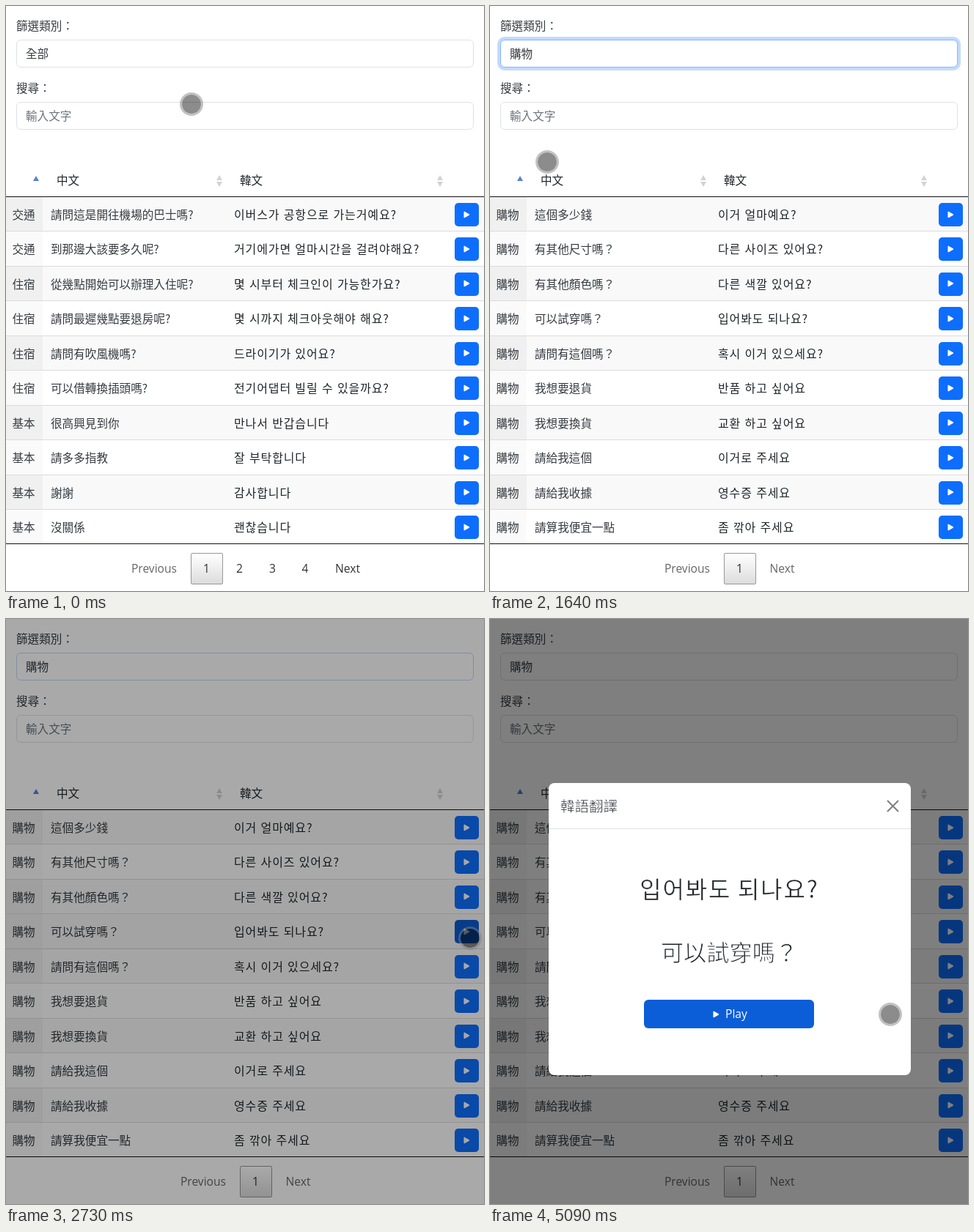
Recreate the animation shown at these times as an HTML page. Size 652 px wide and 799 px high, loop 6 s.

```html
<!DOCTYPE html>
<html lang="zh-Hant">
<head>
<meta charset="utf-8">
<title>韓語翻譯</title>
<style>
html, body { margin: 0; width: 100%; height: 100%; overflow: hidden; background: #fff; }
body {
  position: relative; color: #363b40;
  font: 350 15.6px/24px "Noto Sans CJK TC", "Noto Sans CJK JP", "Noto Sans CJK", sans-serif;
}
#stage { position: absolute; inset: 0; width: 652px; height: 799px; overflow: hidden; white-space: nowrap; }
#stage * { position: absolute; box-sizing: border-box; }
.ko { color: #212529; font: 400 16px/24px "Noto Sans CJK KR", "Noto Sans CJK JP", "Noto Sans CJK", sans-serif; letter-spacing: .055em; }
.en { font: 400 15.6px/24px "Open Sans", "Noto Sans", sans-serif; }

/* form */
.field { left: 14px; width: 624px; height: 38px; border: 1px solid #dee2e6; border-radius: 6px; background: #fff; }
.field span { left: 12px; top: 5px; }
.hint { color: #6c757d; }

/* table */
.head { left: 0; top: 260px; width: 652px; height: 1px; background: #111; }
.foot { left: 0; top: 734px; width: 652px; height: 1px; background: #111; }
.row { left: 0; width: 652px; height: 47.45px; border-bottom: 1px solid #dcdcdc; background: #fff; }
.row:nth-child(odd) { background: #f9f9f9; }
.row:last-child { border: 0; }
.row .cat { left: 0; top: 0; width: 50px; height: 100%; padding: 11px 0 0 8.5px; background: #fafafa; }
.row:nth-child(odd) .cat { background: #f0f0f0; }
.row .zh { left: 61px; top: 11px; }
.row .ko { left: 311px; top: 11px; }
.row .btn { left: 612px; top: 8px; width: 33px; height: 32px; border-radius: 5px; background: #0d6efd; }
.tri { width: 9px; height: 10px; fill: #fff; stroke: #fff; stroke-linejoin: round; stroke-width: 1.5; }
.btn .tri { left: 11.5px; top: 10.5px; }

/* pagination */
.page { top: 756px; width: 80px; margin-left: -40px; text-align: center; color: #333; }
.off { color: #666; }
.current { top: 747px; width: 44px; height: 43px; border: 1px solid #979797; border-radius: 2px; background: linear-gradient(#fff, #dcdcdc); }

/* dropdown */
#menu {
  left: 14px; top: 84px; width: 624px; height: 191px; padding: 0; overflow: visible;
  border: 1px solid #a4a4a4; border-radius: 5px; background: #fff;
  box-shadow: 0 24px 36px -10px rgba(0,0,0,.32), 0 2px 8px rgba(0,0,0,.16);
}
#menu div { left: 0; width: 622px; height: 31.7px; padding: 3px 0 0 12px; }

/* modal; the white text stroke thins the large glyphs */
#shade { inset: 0; background: #000; opacity: 0; }
#modal { left: 80px; top: 224px; width: 494px; height: 399px; border-radius: 8px; background: #fff; }
#modal h5 { left: 16px; top: 16px; margin: 0; font-size: 19.5px; font-weight: 350; line-height: 30px; -webkit-text-stroke: .4px #fff; }
#modal hr { left: 0; top: 62px; width: 494px; height: 1px; margin: 0; border: 0; background: #dee2e6; }
#modal p { left: 1px; width: 491px; margin: 0; text-align: center; line-height: 46px; color: #212529; -webkit-text-stroke: .9px #fff; }
#close { left: 461px; top: 23px; width: 17px; height: 17px; fill: none; stroke: #7f7f7f; stroke-width: 2; stroke-linecap: round; }
#play { left: 130px; top: 296px; width: 232px; height: 39px; border-radius: 6px; background: #0d6efd; color: #fff; }
#play .tri { left: 94px; top: 15px; }
#play b { left: 111px; top: 7px; font-weight: 500; }
#play i { left: 88px; top: 15px; width: 10px; height: 10px; border: solid #fff; border-width: 0 3.5px; border-radius: 2px; }
#play .pause b { left: 104px; }

/* pointers */
#dot, #arrow { left: 0; top: 0; }
#dot {
  width: 32px; height: 32px; margin: -16px; border-radius: 50%;
  border: 3px solid rgba(128,128,128,.48); background: rgba(0,0,0,.45); background-clip: padding-box;
}
#arrow { width: 13px; height: 20px; fill: #fff; stroke: #222; stroke-width: 1; }

.before, .after, .ring, #menu, .first, .third, .touched, .touched .btn, #shade, #modal, #play, .play, .pause, #dot, #arrow {
  animation: 6s step-end infinite;
}
.before { animation-name: before; }
.after { animation-name: after; }
.ring { animation-name: ring; }
#menu { animation-name: menu; }
.first { animation-name: first; }
.third { animation-name: third; }
.touched { animation-name: touch; }
.touched .btn { animation-name: press; }
#shade { animation-name: shade; }
#modal { animation-name: modal; }
#play { animation-name: hover; }
.play { animation-name: play; }
.pause { animation-name: pause; }
#dot { animation-name: dot; }
#arrow { animation-name: arrow; }

@keyframes before { 0% { visibility: visible } 21.16%, 100% { visibility: hidden } }
@keyframes after { 0% { visibility: hidden } 21.16%, 100% { visibility: visible } }
@keyframes ring {
  0% { border-color: #dee2e6; box-shadow: none }
  9.16% { border-color: #86b7fe; box-shadow: 0 0 0 4px rgba(13,110,253,.25) }
  44% { border-color: #9dc4fd; box-shadow: 0 0 0 3px rgba(13,110,253,.18) }
  45.5% { border-color: #c3d7f5; box-shadow: none }
  47%, 100% { border-color: #dee2e6; box-shadow: none }
}
@keyframes menu { 0% { visibility: hidden } 10.66% { visibility: visible } 21.16%, 100% { visibility: hidden } }
@keyframes first { 0% { background: #ade0f5; color: #fff } 19.66%, 100% { background: none; color: #363b40 } }
@keyframes third { 0% { background: none; color: #363b40 } 19.66%, 100% { background: #ade0f5; color: #fff } }
@keyframes touch { 0% { filter: none } 44% { filter: brightness(.96) } 60.66%, 100% { filter: none } }
@keyframes press { 0% { background: #0d6efd } 41% { background: #0b5ed7 } 60.66%, 100% { background: #0d6efd } }
@keyframes shade { 0% { opacity: 0 } 44% { opacity: .08 } 45.5% { opacity: .336 } 47%, 100% { opacity: .5 } }
@keyframes modal {
  0% { visibility: hidden; translate: 0 -50px }
  48.5% { visibility: visible; translate: 0 -16px }
  50% { visibility: visible; translate: 0 -3px }
  51.5%, 100% { visibility: visible; translate: 0 0 }
}
@keyframes hover { 0% { background: #0d6efd } 56%, 100% { background: #0b5ed7 } }
@keyframes play { 0% { opacity: 1 } 60.66% { opacity: 0 } 83.33%, 100% { opacity: 1 } }
@keyframes pause { 0% { opacity: 0 } 60.66% { opacity: 1 } 83.33%, 100% { opacity: 0 } }
@keyframes arrow {
  0% { visibility: hidden; translate: 132px 66px }
  12.16% { visibility: visible; translate: 120px 92px }
  13.66% { visibility: visible; translate: 88px 140px }
  15.16% { visibility: visible; translate: 62px 188px }
  16.66% { visibility: visible; translate: 52px 212px }
  19.66% { visibility: visible; translate: 53px 204px }
  22.66%, 100% { visibility: hidden; translate: 53px 204px }
}
@keyframes dot {
  0% { translate: 253px 134px; visibility: visible }
  1.5% { translate: 232px 84px }
  3% { translate: 196px 40px }
  4.5% { translate: 162px 22px }
  6% { translate: 148px 60px; visibility: visible }
  12.16% { translate: 59px 208px; visibility: hidden }
  22.66% { translate: 59px 208px; visibility: visible }
  27.33% { translate: 78px 213px }
  28.83% { translate: 150px 238px }
  30.33% { translate: 274px 290px }
  31.83% { translate: 412px 356px }
  33.33% { translate: 528px 416px }
  34.83% { translate: 598px 448px }
  36.33% { translate: 624px 454px }
  37.83% { translate: 629px 446px }
  39.33% { translate: 631px 439px }
  41% { translate: 632px 436px }
  45.5% { translate: 633px 436px }
  47% { translate: 629px 437px }
  48.5% { translate: 346px 531px }
  50% { translate: 326px 541px }
  51.5% { translate: 318px 545px }
  56% { translate: 315px 547px }
  57.5% { translate: 311px 550px }
  59.16% { translate: 307px 553px }
  60.66% { translate: 305px 554px }
  65.16% { translate: 304px 554px }
  72.66% { translate: 340px 552px }
  74.33% { translate: 436px 546px }
  75.83% { translate: 520px 541px }
  77.33% { translate: 543px 540px }
  83.33% { translate: 545px 540px }
  84.83%, 100% { translate: 546px 540px; visibility: visible }
}
</style>
</head>
<body>
<div id="stage">
  <span style="left:14px;top:14px">篩選類別：</span>
  <div class="field ring" style="top:46px"><span class="before">全部</span><span class="after">購物</span></div>
  <span style="left:14px;top:99px">搜尋：</span>
  <div class="field" style="top:131px"><span class="hint">輸入文字</span></div>

  <svg style="left:0;top:220px" width="652" height="40">
    <path fill="#5b7fd6" d="M37 19l4-7 4 7z"/>
    <path fill="#d3d3d3" d="M287 18l4-7 4 7zM287 20h8l-4 7zM588 18l4-7 4 7zM588 20h8l-4 7z"/>
  </svg>
  <span style="left:69px;top:225px;color:#212529">中文</span>
  <span style="left:319px;top:225px;color:#212529">韓文</span>

  <div id="all" class="before" style="left:0;top:261px"></div>
  <div id="shop" class="after" style="left:0;top:261px"></div>
  <div class="head"></div>
  <div class="foot"></div>

  <div class="before en" style="left:0;top:0">
    <div class="current" style="left:252px"></div>
    <span class="page off" style="left:202px">Previous</span>
    <span class="page" style="left:273.5px">1</span>
    <span class="page" style="left:318.5px">2</span>
    <span class="page" style="left:363.5px">3</span>
    <span class="page" style="left:408px">4</span>
    <span class="page" style="left:466px">Next</span>
  </div>
  <div class="after en" style="left:0;top:0">
    <div class="current" style="left:319px"></div>
    <span class="page off" style="left:269px">Previous</span>
    <span class="page" style="left:340.5px">1</span>
    <span class="page off" style="left:398.5px">Next</span>
  </div>

  <div id="menu"></div>
  <div id="shade"></div>

  <div id="modal">
    <h5>韓語翻譯</h5>
    <svg id="close" viewBox="0 0 17 17"><path d="M1.5 1.5l14 14M15.5 1.5l-14 14"/></svg>
    <hr>
    <p class="ko" style="top:120px;font-size:32px;-webkit-text-stroke-width:.5px">입어봐도 되나요?</p>
    <p style="top:207px;font-size:31.2px">可以試穿嗎？</p>
    <div id="play" class="en">
      <div class="play" style="inset:0"><svg class="tri" viewBox="0 0 9 10"><path d="M1.2 1.4v7.2L7.4 5z"/></svg><b>Play</b></div>
      <div class="pause" style="inset:0"><i></i><b>Pause</b></div>
    </div>
  </div>

  <svg id="arrow" viewBox="0 0 13 20"><path d="M.7 1v15l3.5-3.3 2.4 5.8 2.4-1-2.4-5.6h4.9z"/></svg>
  <div id="dot"></div>
</div>
<script>
const all = [
  ['交通', '請問這是開往機場的巴士嗎?', '이버스가 공항으로 가는거예요?'],
  ['交通', '到那邊大該要多久呢?', '거기에가면 얼마시간을 걸려야해요?'],
  ['住宿', '從幾點開始可以辦理入住呢?', '몇 시부터 체크인이 가능한가요?'],
  ['住宿', '請問最遲幾點要退房呢?', '몇 시까지 체크아웃해야 해요?'],
  ['住宿', '請問有吹風機嗎?', '드라이기가 있어요?'],
  ['住宿', '可以借轉換插頭嗎?', '전기어댑터 빌릴 수 있을까요?'],
  ['基本', '很高興見到你', '만나서 반갑습니다'],
  ['基本', '請多多指教', '잘 부탁합니다'],
  ['基本', '謝謝', '감사합니다'],
  ['基本', '沒關係', '괜찮습니다']
];
const shop = [
  ['這個多少錢', '이거 얼마예요?'],
  ['有其他尺寸嗎？', '다른 사이즈 있어요?'],
  ['有其他顏色嗎？', '다른 색깔 있어요?'],
  ['可以試穿嗎？', '입어봐도 되나요?'],
  ['請問有這個嗎？', '혹시 이거 있으세요?'],
  ['我想要退貨', '반품 하고 싶어요'],
  ['我想要換貨', '교환 하고 싶어요'],
  ['請給我這個', '이거로 주세요'],
  ['請給我收據', '영수증 주세요'],
  ['請算我便宜一點', '좀 깎아 주세요']
].map(r => ['購物', ...r]);

const icon = '<svg class="tri" viewBox="0 0 9 10"><path d="M1.2 1.4v7.2L7.4 5z"/></svg>';
const fill = (id, html) => { document.getElementById(id).innerHTML = html.join(''); };
const rows = (list, touched) => list.map(([cat, zh, ko], i) =>
  `<div class="row${i === touched ? ' touched' : ''}" style="top:${i * 47.45}px"><span class="cat">${cat}</span>` +
  `<span class="zh">${zh}</span><span class="ko" lang="ko">${ko}</span><div class="btn">${icon}</div></div>`);

fill('all', rows(all));
fill('shop', rows(shop, 3));
fill('menu', ['全部', '餐廳', '基本', '購物', '住宿', '交通'].map((name, i) =>
  `<div class="${{ 0: 'first', 3: 'third' }[i] || ''}" style="top:${i * 31.6}px">${name}</div>`));
</script>
</body>
</html>
```
